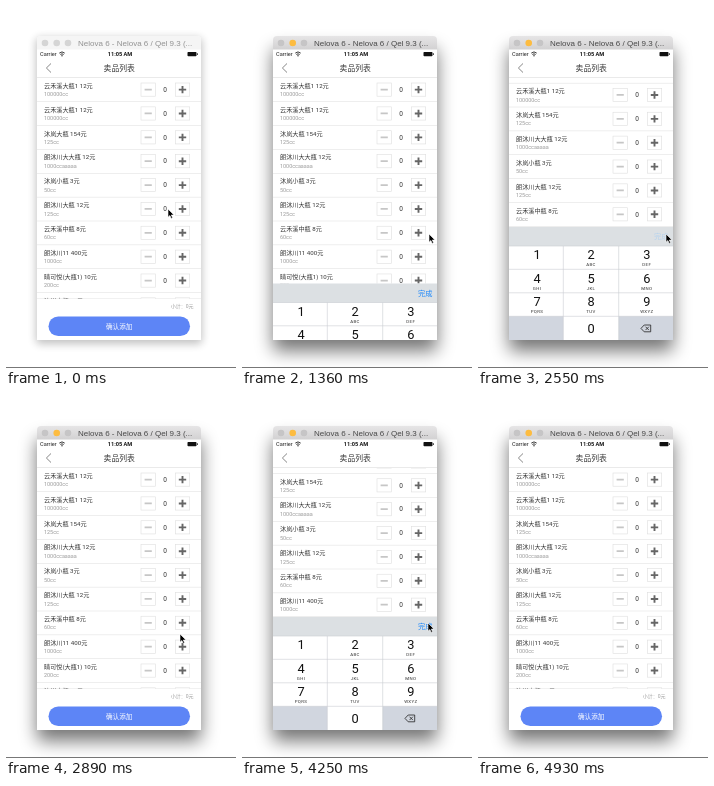
These frames come from a looping animation (230x362 px, 5100 ms). An HTML page:

```html
<!DOCTYPE html>
<html lang="zh">
<head>
<meta charset="utf-8">
<style>
html, body { margin: 0; width: 100%; height: 100%; overflow: hidden; background: #fff; }
svg { display: block; width: 230px; height: 362px; }
text { font-family: Roboto, "Noto Sans CJK SC", "Noto Sans CJK", sans-serif; }
</style>
</head>
<body>
<svg id="stage" viewBox="0 0 230 362" xmlns="http://www.w3.org/2000/svg">
  <defs>
    <filter id="blur" x="-30%" y="-30%" width="160%" height="160%"><feGaussianBlur stdDeviation="8.8"/></filter>
    <filter id="soft" x="-30%" y="-30%" width="160%" height="160%"><feGaussianBlur stdDeviation="4"/></filter>
    <linearGradient id="bar" x2="0" y2="1"><stop stop-color="#e6e5e6"/><stop offset="1" stop-color="#d2d1d2"/></linearGradient>
    <clipPath id="win"><path d="M31 334V34q0-4 4-4h156q4 0 4 4v300z"/></clipPath>
    <clipPath id="view"><rect x="31" y="72" width="164" height="221"/></clipPath>
    <clipPath id="page"><rect x="31" y="0" width="164" height="292.8"/></clipPath>
  </defs>
  <rect width="230" height="362" fill="#fff"/>
  <rect y="361" width="230" height="1" fill="#777"/>
  <rect id="idleShade" x="30" y="32" width="166" height="306" rx="4" filter="url(#soft)" opacity=".24"/>
  <rect id="liveShade" x="31" y="43" width="164" height="302" rx="4" filter="url(#blur)" opacity=".54"/>
  <g clip-path="url(#win)">
    <rect x="31" y="30" width="164" height="304" fill="#fff"/>
    <rect id="titleBar" x="31" y="30" width="164" height="13.5"/>
    <g id="lights"></g>
    <g id="chrome"></g>
    <g id="footer"></g>
    <g clip-path="url(#view)"><g id="list" clip-path="url(#page)"></g></g>
    <g id="keys"></g>
  </g>
  <path id="pointer" d="M0 0V8.2L1.9 6.5L3.2 9.4L4.6 8.8L3.3 6H6z" fill="#000" stroke="#fff" stroke-width=".6"/>
</svg>
<script>
const NS = "http://www.w3.org/2000/svg";
const $ = id => document.getElementById(id);

function add(parent, tag, attrs, content) {
  const el = document.createElementNS(NS, tag);
  for (const k in attrs) el.setAttribute(k, attrs[k]);
  if (content !== undefined) el.textContent = content;
  parent.appendChild(el);
  return el;
}
const label = (g, x, y, size, fill, str, extra) =>
  add(g, "text", { x, y, "font-size": size, fill, ...extra }, str);
const box = (g, x, y, width, height, fill, extra) =>
  add(g, "rect", { x, y, width, height, fill, ...extra });
const line = (g, d, stroke, w) =>
  add(g, "path", { d, stroke, "stroke-width": w, fill: "none" });
const show = (el, on) => { el.style.display = on ? "" : "none"; };
const mid = { "text-anchor": "middle" };

// Title bar, status bar, navigation
const lights = [39, 50.7, 62].map(cx => add($("lights"), "circle", { cx, cy: 37, r: 3.3 }));
const chrome = $("chrome");
const title = label(chrome, 72, 40, 8, "#555", "Nelova 6 - Nelova 6 / Qel 9.3 (...",
  { style: 'font-family: "Liberation Sans", sans-serif' });
label(chrome, 34, 50.2, 5.6, "#222", "Carrier");
line(chrome, "M53.3 47.1q2.7-2.4 5.4 0M54.4 48.5q1.6-1.4 3.2 0", "#222", .9);
add(chrome, "circle", { cx: 56, cy: 49.7, r: .7, fill: "#222" });
label(chrome, 114, 50.2, 5.6, "#111", "11:05 AM", { ...mid, "font-weight": "bold" });
box(chrome, 181.5, 46, 9, 4.2, "#111", { rx: .8 });
box(chrome, 191, 47.3, .8, 1.6, "#111");
line(chrome, "M45 57.5l-4.6 4.5l4.6 4.5", "#666", .8);
label(chrome, 113.2, 65, 7.8, "#333", "卖品列表", mid);
box(chrome, 31, 71.2, 164, .6, "#ddd");

// Drinks
const ROW = 23.87;
const drinks = [
  ["云禾溪大瓶1 12元", "100000cc"], ["云禾溪大瓶1 12元", "100000cc"],
  ["沐岚大瓶 154元", "125cc"], ["朗沐川大大瓶 12元", "1000ccaaaaa"],
  ["沐岚小瓶 3元", "50cc"], ["朗沐川大瓶 12元", "125cc"],
  ["云禾溪中瓶 8元", "60cc"], ["朗沐川11 400元", "1000cc"],
  ["晴可悦(大瓶1) 10元", "200cc"], ["沐岚中瓶 11元", "100cc"]
];
const list = $("list");
drinks.forEach(([name, size], i) => {
  const g = add(list, "g", { transform: `translate(0 ${72 + i * ROW})` });
  label(g, 38, 9.8, 6.15, "#333", name);
  label(g, 38, 18.2, 5.45, "#999", size);
  for (const x of [135, 169.3])
    box(g, x, 5, 14.4, 13.2, "#fff", { stroke: "#dedede", "stroke-width": .6 });
  line(g, "M138.6 11.6h7.2", "#c6c6c6", 1.8);
  line(g, "M172.8 11.6h7.4M176.5 7.9v7.4", "#666", 1.9);
  label(g, 159, 13.8, 6.5, "#333", "0", mid);
  box(g, 31, 23.4, 164, .5, "#ddd");
});
const caret = box(list, 161.1, 0, .9, 7.6, "#4c6ff0");

const footer = $("footer");
box(footer, 31, 292.2, 164, .5, "#e2e2e2");
label(footer, 187.5, 302, 5, "#999", "小计：0元", { "text-anchor": "end" });
box(footer, 42.5, 310.5, 141.5, 19.5, "#5d85f6", { rx: 9.75 });
label(footer, 113.2, 322.8, 6.6, "#fff", "确认添加", mid);

// Number pad, drawn at its raised position
const keys = $("keys"), PAD = 113;
box(keys, 31, 221, 164, PAD, "#fff");
box(keys, 31, 221, 164, 19, "#dce0e3");
const done = label(keys, 183.3, 233.2, 7.2, "", "完成", { ...mid, "font-weight": 500 });
box(keys, 31, 310.3, 54.3, 24, "#d1d6df");
box(keys, 140.7, 310.3, 54.3, 24, "#d1d6df");
const letters = ["", "ABC", "DEF", "GHI", "JKL", "MNO", "PQRS", "TUV", "WXYZ"];
const cols = [59, 113, 168.8];
letters.forEach((word, i) => {
  const x = cols[i % 3], y = 240 + Math.floor(i / 3) * 23.5;
  label(keys, x, y + 13, 12.8, "#111", i + 1, mid);
  label(keys, x, y + 20, 4.4, "#333", word, { ...mid, "letter-spacing": .35 });
});
label(keys, 113, 326.6, 12.8, "#111", "0", mid);
line(keys, "M31 240h164M31 263.3h164M31 286.8h164M31 310.3h164M85.3 240v94M140.7 240v94", "#c9cdd2", .6);
line(keys, "M163 322.4l3.2-3.4h6.5v6.8h-6.5zM167.5 320.7l3.4 3.4M170.9 320.7l-3.4 3.4", "#222", .8);

// Motion
const LOOP = 5100, STEP = 170;
const pointerPath = [
  [340, 162, 203], [680, 167, 208], [1020, 187, 228], [1360, 187, 228],
  [1700, 160, 228], [2040, 160, 228], [2380, 188, 228], [2720, 188, 228],
  [3060, 160, 248], [3570, 160, 248], [4080, 186, 227], [4590, 186, 227]
];
const padPath = [
  [340, 0], [680, 1], [1190, 1], [1530, 0], [1700, 0], [2040, 1], [2550, 1],
  [2890, 0], [3230, 0], [3400, .54], [3570, 1], [4420, 1], [4760, 0]
];
const focus = [[340, 1190, 5], [1700, 2380, 6], [3230, 4080, 7]];
const presses = [1190, 2550, 4420];

function at(path, t) {
  let i = 0;
  while (i < path.length - 1 && path[i + 1][0] <= t) i++;
  const a = path[i], b = path[i + 1] || a;
  const k = b === a ? 0 : Math.max(0, (t - a[0]) / (b[0] - a[0]));
  return a.slice(1).map((v, j) => v + (b[j + 1] - v) * k);
}

function draw(now) {
  const t = Math.floor((now % LOOP) / STEP) * STEP;
  const live = t >= 340;
  show($("idleShade"), !live);
  show($("liveShade"), live);
  $("titleBar").setAttribute("fill", live ? "url(#bar)" : "#f5f5f5");
  title.setAttribute("fill", live ? "#484848" : "#929292");
  const tints = live ? ["#c6c5c6", "#fdbc40", "#c6c5c6"] : Array(3).fill("#d5d5d5");
  lights.forEach((el, i) => el.setAttribute("fill", tints[i]));

  const [up] = at(padPath, t);
  const shift = t < 1530 ? 0 : t < 2890 ? 18.5 : 42;
  keys.setAttribute("transform", `translate(0 ${PAD * (1 - up)})`);
  list.setAttribute("transform", `translate(0 ${-shift * up})`);
  done.setAttribute("fill", presses.includes(t) ? "#b5d2ee" : "#1a86fb");

  const hit = focus.find(([a, b]) => t >= a && t < b);
  show(caret, hit);
  if (hit) caret.setAttribute("y", 72 + hit[2] * ROW + 7.8);

  const [x, y] = at(pointerPath, t);
  show($("pointer"), t < 4760);
  $("pointer").setAttribute("transform", `translate(${x} ${y})`);
}

const start = performance.now();
function tick() {
  draw(performance.now() - start);
  requestAnimationFrame(tick);
}
tick();
</script>
</body>
</html>
```
